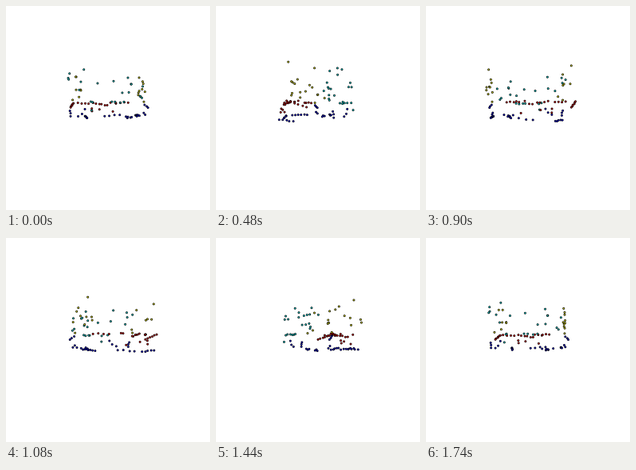
A matplotlib script that plays this animation: 256 px wide and 256 px high, repeating every 1.8 s.

```python
import numpy as np
import matplotlib.pyplot as plt
from matplotlib.animation import FuncAnimation

SIZE, DPI = 256, 100
FRAMES, INTERVAL = 30, 60
DIST = 222  # camera distance in pixels, a 60 degree field of view

rng = np.random.default_rng(4)

BLUE, RED, YELLOW, CYAN = "#0000e6", "#e60000", "#e6e600", "#00dede"


def strand(n, a, b, jitter=0.7):
    """n points scattered along the segment from a to b."""
    return np.linspace(a, b, n) + rng.uniform(-jitter, jitter, (n, 3))


# x to the right, y up, z towards the camera
back = [
    (-46, 45, -34), (-42, 40.5, -8), (-45.6, 26, -31), (-38.3, 24.8, -28),
    (-39, 26, -30), (-37, 14, -4), (-44, 10, 2), (43.6, 42.5, -26),
    (45, 34.4, -8), (45, 31, -4), (45.5, 25, -14), (43, 23.4, -22),
    (44, 22, -34), (44, 18.8, -35), (45, 15.6, -22), (45.5, 20, 4),
    (45, 7.8, 0),
]
front = [
    (-27, 43, 24), (-45, 40.3, 15), (-46, 33.4, 15), (-48.5, 36.5, 6.5),
    (-29, 28, 33), (-10.7, 25.4, 40), (5.7, 27.5, 41), (23.3, 35.4, 15),
    (26.6, 27.6, 18), (26.5, 27, 21), (24, 18, 18), (16, 17, 24),
    (36.6, 13.5, 20), (38.5, 11.5, 21), (41, 25.5, 13), (-35, 22, 7),
    (-19, 7, 27), (-16, 6, 38), (-17, -2.5, 40),
]
front = np.vstack([front, strand(4, (3.4, 6.5, 38), (17, 6, 32))])
seat = np.vstack([
    strand(6, (-50, 6.5, -36), (-51, 1, -16)),
    strand(4, (-42, 7, -25), (-28, 6, -36)),
    strand(6, (-21, 7.5, -33), (-1, 3.5, -42)),
    strand(2, (3.5, 7, -30), (12, 7, -43)),
    strand(4, (11, 7, -17), (26, 7.5, -7)),
    strand(2, (-24, -5, -43), (7, -5, -42)),
    strand(2, (-24, -1, -43), (-13, -1.5, -42)),
])
base = np.vstack([
    strand(5, (-34, -12, -44), (-30, -14, -30)),
    strand(4, (-5, -12, -42), (17, -10.5, -40)),
    strand(6, (40, -10.5, -34), (41, -10, -12)),
    strand(3, (23, -11.5, 8), (26, -11, 12)),
    strand(3, (20, -10.5, 20), (33, -10, 20)),
    strand(3, (46, 3.5, 1), (49, 0, 4)),
    strand(2, (44, -6, 2), (46, -8, 4)),
    strand(3, (-46, -4, 10), (-44, -10, 12)),
    strand(3, (-33.5, -10, 25), (-24.5, -1.7, 31)),
])

groups = [(back, YELLOW), (front, CYAN), (seat, RED), (base, BLUE)]
x, y, z = np.vstack([pts for pts, _ in groups]).T
colors = np.repeat([c for _, c in groups], [len(pts) for pts, _ in groups])

fig = plt.figure(figsize=(SIZE / DPI, SIZE / DPI), dpi=DPI, facecolor="white")
ax = fig.add_axes([0, 0, 1, 1])
ax.set_xlim(0, SIZE)
ax.set_ylim(SIZE, 0)
ax.axis("off")

px = 72 / DPI
dots = ax.scatter(x, y, s=(2.2 * px) ** 2, c=colors,
                  edgecolors="black", linewidths=0.7 * px)


def update(frame):
    angle = 2 * np.pi * frame / FRAMES
    cos, sin = np.cos(angle), np.sin(angle)
    across = x * cos + z * sin
    depth = z * cos - x * sin
    scale = DIST / (DIST - depth)
    order = np.argsort(depth)
    pos = np.column_stack([SIZE / 2 + across * scale, SIZE / 2 - y * scale])
    dots.set_offsets(pos[order])
    dots.set_facecolors(colors[order])
    return (dots,)


anim = FuncAnimation(fig, update, frames=FRAMES, interval=INTERVAL,
                     repeat=True, repeat_delay=0)
plt.show()
```
